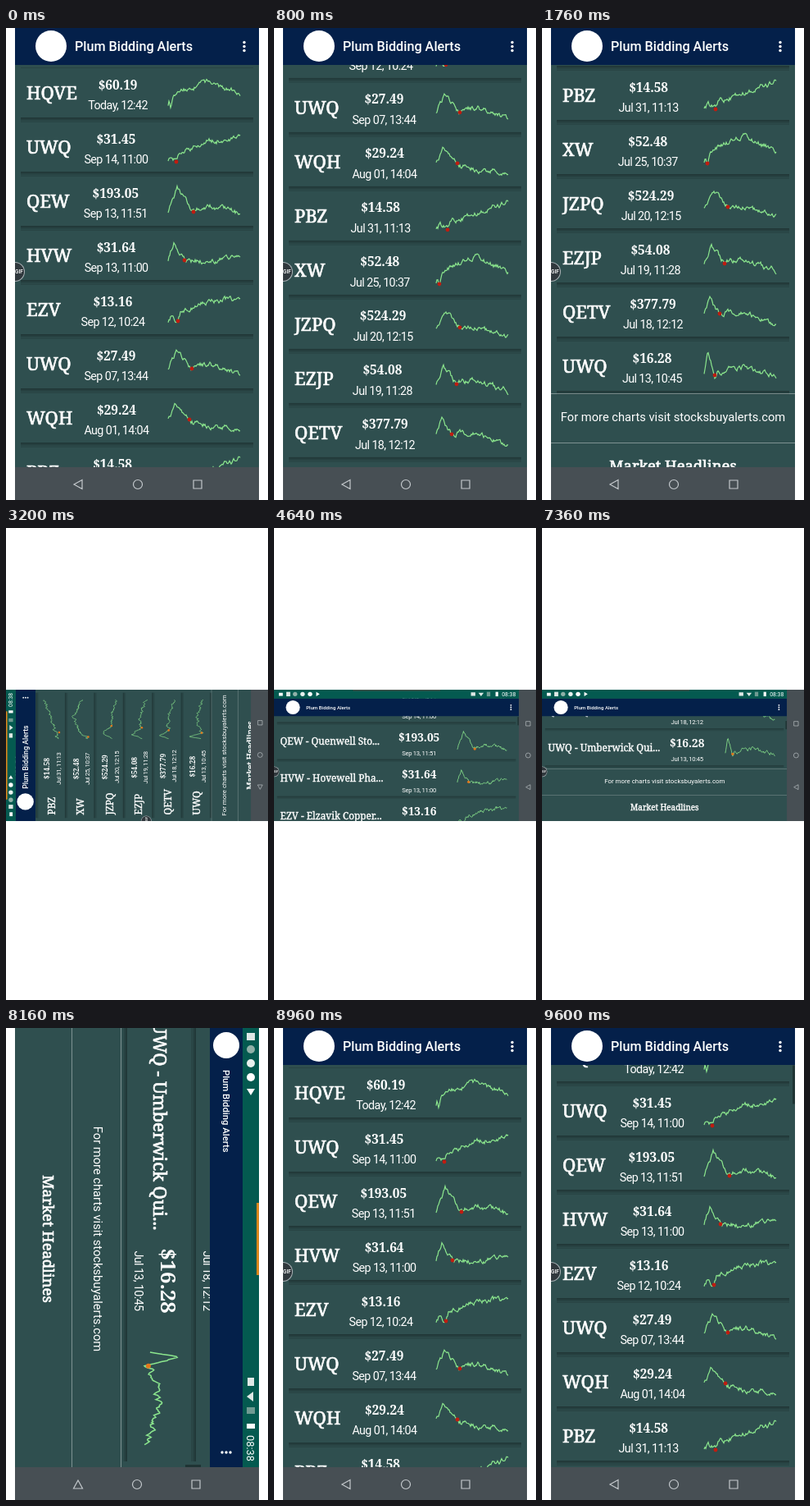
These frames come from a looping animation (320 px wide and 575 px high, 9760 ms). An HTML page with a canvas:

```html
<!DOCTYPE html>
<html lang="en">
<head>
<meta charset="utf-8">
<title>Plum Bidding Alerts</title>
<style>
  html, body { margin: 0; width: 100%; height: 100%; overflow: hidden; background: #fff; }
  canvas { display: block; }
</style>
</head>
<body>
<canvas id="stage" width="320" height="575"></canvas>
<script>
const ctx = document.getElementById('stage').getContext('2d');
const LOOP = 9760, STEP = 160, SMALL = 160 / 298;
const SERIF = '"Noto Serif", serif', SANS = 'Roboto, sans-serif';

// label, price, date, alert point on the chart, chart height half way and at the end
const rows = [
  ['HQVE - Halquove Bev...', '$60.19', 'Today, 12:42', [3, 18], -13, -1],
  ['UWQ - Umberwick Qui...', '$31.45', 'Sep 14, 11:00', [10, 18], -7, -11],
  ['QEW - Quenwell Sto...', '$193.05', 'Sep 13, 11:51', [31, 13], 5, 15],
  ['HVW - Hovewell Pha...', '$31.64', 'Sep 13, 11:00', [20, 6], 7, 2],
  ['EZV - Elzavik Copper...', '$13.16', 'Sep 12, 10:24', [12, 14], -10, -13],
  ['UWQ - Umberwick Qui...', '$27.49', 'Sep 07, 13:44', [29, 6], 0, 14],
  ['WQH - Wuqa Hotels ...', '$29.24', 'Aug 01, 14:04', [26, 2], 9, 12],
  ['PBZ - Pebruz Quarrie...', '$14.58', 'Jul 31, 11:13', [14, 17], -2, -17],
  ['XW - Xelwick Textile...', '$52.48', 'Jul 25, 10:37', [4, 17], -15, 1],
  ['JZPQ - Jezpaq Robot...', '$524.29', 'Jul 20, 12:15', [29, 4], 5, 15],
  ['EZJP - Ezjora Panels...', '$54.08', 'Jul 19, 11:28', [25, 7], 3, 15],
  ['QETV - Quetova Tele...', '$377.79', 'Jul 18, 12:12', [19, 2], 0, 16],
  ['UWQ - Umberwick Qui...', '$16.28', 'Jul 13, 10:45', [13, 11], 1, 13]
].map(([label, price, date, dot, middle, end], i) => ({
  label, price, date, dot, alerted: i > 0,
  ticker: label.split(' - ')[0],
  chart: chartPath(dot, middle, end, i + 1)
}));

const portrait = {
  w: 298, h: 597, right: 298, bottom: 557, status: 22, header: 45,
  logo: [44, 44, 19], titleSize: 16.2,
  first: 71, pitch: 66, cardH: 60, mid: 30, label: 'ticker',
  priceSize: 15.5, dateDy: 15, chartX: 187, chartScale: 1, dotR: 2.4,
  more: 955, headlines: 1014, centre: 149, thumb: 47, bubbleY: 319,
  nav: k => [77 + 73 * k, 578]
};
const landscape = {
  w: 597, h: 298, right: 557, bottom: 298, status: 20, header: 40,
  logo: [43, 40, 16], titleSize: 11.3,
  first: 66, pitch: 84, cardH: 78, mid: 38, label: 'label', priceX: 330,
  priceSize: 25.6, dateDy: 26, chartX: 417, chartScale: 1.28, dotR: 3,
  more: 1188, headlines: 1248, centre: 279, thumb: 19, bubbleY: 186,
  nav: k => [578, 221 - 72 * k]
};

const views = {
  upright: [1, 0, 0, 1, 11, -22],
  tilted: [0, -SMALL, SMALL, 0, 0, 357],
  wide: [SMALL, 0, 0, SMALL, 0, 197],
  turned: [0, 1, -1, 0, 309, -22]
};

const portraitScroll = [[0, 0], [1120, 437], [1280, 437], [1760, 459]];
const landscapeScroll = [[4160, 0], [7200, 978], [8160, 991]];
const countdown = [[4000, 110], [8160, 44]];

function along(points, t) {
  if (t <= points[0][0]) return points[0][1];
  for (let i = 1; i < points.length; i++) {
    const [t0, v0] = points[i - 1], [t1, v1] = points[i];
    if (t <= t1) return v0 + (v1 - v0) * (t - t0) / (t1 - t0);
  }
  return points[points.length - 1][1];
}

// Price line 88 units wide: a trend through the alert point plus seeded wandering.
// Charts whose alert is not near the bottom peak before it.
function chartPath([dotX, dotY], middle, end, seed) {
  const path = new Path2D(), peak = dotY < 14 ? -16 : dotY - 6;
  const trend = [[0, dotY], [dotX * 0.35, peak], [dotX, dotY], [dotX + 4, (dotY + middle) / 2],
    [48, middle], [88, end]];
  let wander = 0;
  for (let x = 0; x <= 88; x++) {
    const r = Math.sin(seed * 91.7 + x * 47.3) * 43758.5;
    wander = wander * 0.72 + (r - Math.floor(r) - 0.5) * 5;
    path.lineTo(x, along(trend, x) + wander);
  }
  return path;
}

function rect(x, y, w, h, color) {
  ctx.fillStyle = color;
  ctx.fillRect(x, y, w, h);
}

function disc(x, y, r, color) {
  ctx.fillStyle = color;
  ctx.beginPath();
  ctx.arc(x, y, r, 0, 7);
  ctx.fill();
}

function polygon(...points) {
  ctx.beginPath();
  for (const point of points) ctx.lineTo(...point);
  ctx.closePath();
}

function text(str, x, y, size, family, weight = 400, align = 'center') {
  ctx.font = `${weight} ${size}px ${family}`;
  ctx.textAlign = align;
  ctx.fillStyle = '#fff';
  ctx.fillText(str, x, y + size * 0.357);
}

// A thin outline gives the serif face its medium weight.
function heading(str, x, y, size, align) {
  text(str, x, y, size, SERIF, 400, align);
  ctx.strokeStyle = '#fff';
  ctx.lineWidth = 0.7;
  ctx.strokeText(str, x, y + size * 0.357);
}

function drawRow(row, top, app, dotColor) {
  const y = top + app.mid, cardW = app.right - 14;
  rect(7, top - 1, cardW, 1, 'rgba(0,0,0,.12)');
  for (let k = 0; k < 5; k++)
    rect(7, top + app.cardH + k, cardW, 1, `rgba(0,0,0,${0.3 - k * 0.055})`);

  const name = row[app.label];
  heading(name, 14, y, 22, 'left');
  const priceX = app.priceX || 107 + 0.3 * ctx.measureText(name).width;
  text(row.price, priceX, y - 10, app.priceSize, SERIF, 700);
  ctx.letterSpacing = '-0.6px';
  text(row.date, priceX, y + app.dateDy, 14.3, SANS);
  ctx.letterSpacing = '0px';

  ctx.save();
  ctx.translate(app.chartX, y);
  ctx.scale(app.chartScale, app.chartScale);
  ctx.strokeStyle = '#8be68d';
  ctx.lineWidth = 1.2;
  ctx.stroke(row.chart);
  if (row.alerted) disc(...row.dot, app.dotR / app.chartScale, dotColor);
  ctx.restore();
}

function drawStatus(app, half, barColor) {
  const y = app.status / 2, r = app.right;
  rect(0, 0, r, app.status, '#045a50');
  rect(11, y - 3, 9, 7, '#fff');
  rect(28, y - 5, 9, 10, '#dfe8e6');
  ['#8fb0a8', '#e8f0ee', '#fff'].forEach((color, k) => disc(48 + 17 * k, y, 5, color));
  polygon([96, y - 5], [104, y], [96, y + 5]);
  ctx.fill();
  rect(r - 109, y - 4, 10, 8, '#dfe8e6');
  polygon([r - 92, y - 3], [r - 80, y - 3], [r - 86, y + 5]);
  ctx.fill();
  rect(r - 73, y - 5, 8, 10, '#6f9a92');
  rect(r - 53, y - 5, 6, 10, '#fff');
  text('08:38', r - 23, y, 12.8, SANS);
  rect(app.centre - half, 0, half * 2, 3, barColor);
}

function drawNav(app) {
  const [back, home, recent] = [0, 1, 2].map(app.nav);
  ctx.fillStyle = '#474f54';
  ctx.fill(navBar(app));
  ctx.strokeStyle = '#c3c8cc';
  ctx.lineWidth = 1.2;
  polygon([back[0] - 5, back[1]], [back[0] + 5, back[1] - 5.5], [back[0] + 5, back[1] + 5.5]);
  ctx.moveTo(home[0] + 5.5, home[1]);
  ctx.arc(...home, 5.5, 0, 7);
  ctx.rect(recent[0] - 5, recent[1] - 5, 10, 10);
  ctx.stroke();
}

function navBar({ w, h, right, bottom }) {
  const bar = new Path2D();
  if (right < w) bar.rect(right, 0, w - right, h);
  else bar.rect(0, bottom, w, h - bottom);
  return bar;
}

function drawApp(app, scroll, { dotColor, half, barColor, thumb }) {
  const top = app.status + app.header, headerY = app.status + app.header / 2;
  ctx.beginPath();
  ctx.rect(0, 0, app.w, app.h);
  ctx.clip();
  rect(0, 0, app.w, app.h, '#2f4f4f');

  rows.forEach((row, i) => {
    const y = app.first + app.pitch * i - scroll;
    if (y > -app.pitch && y < app.bottom) drawRow(row, y, app, dotColor);
  });
  for (const dy of [-29, 31]) rect(0, app.more - scroll + dy, app.right, 1, 'rgba(255,255,255,.38)');
  text('For more charts visit stocksbuyalerts.com', app.centre, app.more - scroll, 14.7, SANS);
  heading('Market Headlines', app.centre, app.headlines - scroll, 18.4, 'center');
  if (thumb) rect(app.right - 3, top + scroll / 90, 3, app.thumb, 'rgba(0,0,0,.35)');

  rect(0, app.status, app.right, app.header, '#04204a');
  disc(...app.logo, '#fff');
  text('Plum Bidding Alerts', 73, headerY, app.titleSize, SANS, 500, 'left');
  for (const dy of [-5, 0, 5]) disc(app.right - 18, headerY + dy, 1.7, '#fff');

  drawStatus(app, half, barColor);
  drawNav(app);

  disc(0, app.bubbleY, 12, '#aab2b6');
  disc(0, app.bubbleY, 11, '#30383d');
  text('GIF', 0, app.bubbleY, 6.5, SANS, 500, 'left');
}

function render(t) {
  const wide = t >= 4000 && t < 8960;
  const small = t >= 3200 && t < 8160;
  const view = wide ? (small ? 'wide' : 'turned') : (small ? 'tilted' : 'upright');
  const scroll = wide ? along(landscapeScroll, t)
    : t < 8960 ? along(portraitScroll, t)
    : t >= 9600 ? 44 : 0;

  ctx.resetTransform();
  rect(0, 0, 320, 575, '#fff');
  ctx.save();
  ctx.setTransform(...views[view]);
  drawApp(wide ? landscape : portrait, scroll, {
    dotColor: view === 'upright' ? '#c01c10' : '#e2761c',
    half: wide ? along(countdown, t) : 100,
    barColor: view === 'wide' ? '#3d5048' : '#d8861c',
    thumb: wide || t >= 9120
  });
  ctx.restore();
}

const start = performance.now();
function tick() {
  const t = (performance.now() - start) % LOOP;
  render(Math.floor(t / STEP) * STEP);
  requestAnimationFrame(tick);
}
tick();
</script>
</body>
</html>
```
